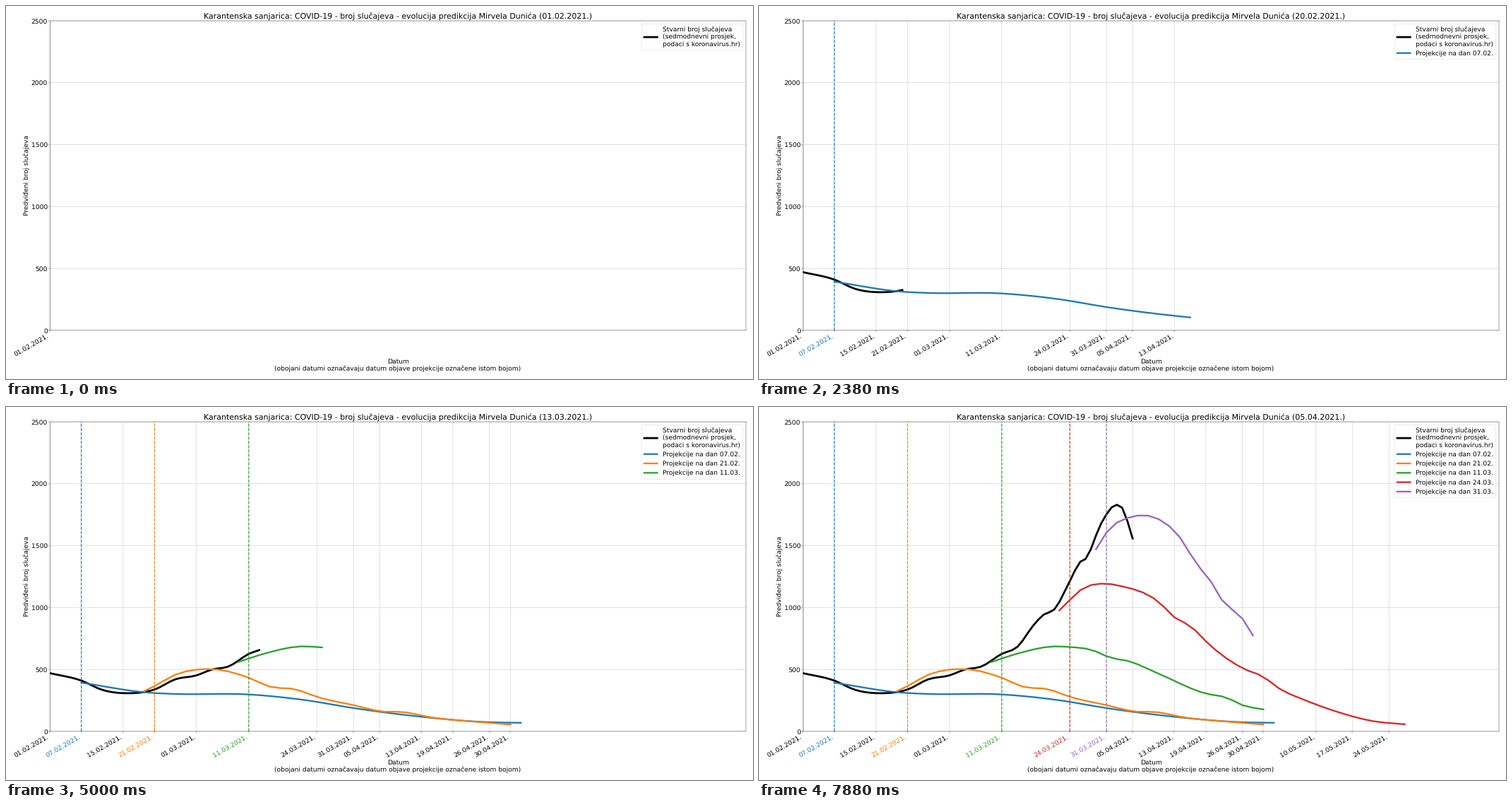
Write a matplotlib script that moves like this. It is 1058 px wide and 529 px high and loops after 8 s.

```python
import matplotlib.pyplot as plt
import numpy as np
from matplotlib.animation import FuncAnimation
from matplotlib.dates import num2date

WIDTH, HEIGHT = 1058, 529
FIRST_DAY = 18659  # 1 February 2021, in days since 1970
FRAMES, LAST_DAY = 64, 133
REVEAL = 5  # days of a projection uncovered per frame
TICKS = [0, 6, 14, 20, 28, 38, 51, 58, 63, 71, 77, 84, 88, 98, 105, 112]

# Key points as (day, cases)
CASES = [(0, 470), (6, 410), (10, 335), (15, 308), (20, 338), (24, 421),
         (28, 452), (31, 500), (34, 522), (38, 626), (41, 683), (44, 854),
         (46, 943), (48, 983), (51, 1213), (53, 1370), (54, 1392), (57, 1680),
         (60, 1830), (61, 1806), (63, 1558)]

# Publication day, colour, key points
PROJECTIONS = [
    (6, "tab:blue", [(6, 393), (19, 312), (24, 302), (38, 298), (49, 251),
                     (58, 188), (69, 127), (84, 74), (90, 69)]),
    (20, "tab:orange", [(18, 325), (20, 366), (24, 458), (29, 502), (32, 499),
                        (38, 433), (42, 361), (47, 339), (51, 279), (58, 212),
                        (64, 158), (67, 158), (73, 112), (83, 72), (88, 55)]),
    (38, "tab:green", [(36, 560), (41, 628), (48, 686), (51, 681), (55, 660),
                       (59, 592), (62, 570), (68, 465), (77, 305), (81, 272),
                       (84, 211), (88, 177)]),
    (51, "tab:red", [(49, 977), (54, 1166), (57, 1193), (61, 1171), (68, 1045),
                     (71, 920), (74, 851), (78, 687), (84, 510), (88, 440),
                     (91, 346), (96, 251), (102, 159), (109, 82), (115, 57)]),
    (58, "tab:purple", [(56, 1470), (58, 1606), (63, 1735), (67, 1731),
                        (72, 1569), (75, 1367), (78, 1208), (81, 1007),
                        (83, 962), (86, 774)]),
]
COLORS = {start: color for start, color, _ in PROJECTIONS}


def date(day, fmt="%d.%m.%Y."):
    return num2date(FIRST_DAY + day).strftime(fmt)


def smooth(keys, step):
    """Sample a cubic Hermite curve through the key points every `step` days."""
    x, y = np.array(keys, float).T
    slope = np.gradient(y, x)
    days = np.arange(x[0], x[-1] + 1, step)
    i = np.clip(np.searchsorted(x, days, side="right") - 1, 0, len(x) - 2)
    h = x[i + 1] - x[i]
    t = (days - x[i]) / h
    rise = t * t * (3 - 2 * t)
    bend = t * (1 - t) * ((1 - t) * slope[i] - t * slope[i + 1])
    return days, y[i] + (y[i + 1] - y[i]) * rise + h * bend


plt.rcParams.update({"font.family": "DejaVu Sans", "font.size": 20,
                     "text.hinting": "none", "path.snap": False})
fig = plt.figure(figsize=(32, 16), dpi=WIDTH / 32)
left, right, top, bottom = 62.2, 1048, 21, 460
ax = fig.add_axes([left / WIDTH, 1 - bottom / HEIGHT,
                   (right - left) / WIDTH, (bottom - top) / HEIGHT])
ax.set_xlim(0, LAST_DAY)
ax.set_ylim(0, 2500)
ax.set_yticks(range(0, 2501, 500))
ax.grid(True)
ax.set_ylabel("Predviđeni broj slučajeva")
ax.set_xlabel("Datum\n(obojani datumi označavaju datum objave "
              "projekcije označene istom bojom)")
title = ax.set_title("")

case_days, cases = smooth(CASES, 1)
actual, = ax.plot([], [], color="black", lw=6,
                  label="Stvarni broj slučajeva\n(sedmodnevni prosjek,\n"
                        "podaci s koronavirus.hr)")
projections = []
for start, color, keys in PROJECTIONS:
    curve, = ax.plot([], [], color=color, lw=5,
                     label="Projekcije na dan " + date(start, "%d.%m."))
    marker = ax.axvline(start, color=color, lw=2.5, ls="--")
    projections.append((start, curve, marker, *smooth(keys, 2)))


def draw(today):
    title.set_text("Karantenska sanjarica: COVID-19 - broj slučajeva - evolucija "
                   f"predikcija Mirvela Dunića ({date(today)})")
    actual.set_data(case_days[:today + 1], cases[:today + 1])

    reach = today
    handles = [actual]
    for start, curve, marker, days, values in projections:
        active = today >= start
        shown = active & (days < start + REVEAL * (today - start + 1))
        curve.set_data(days[shown], values[shown])
        marker.set_visible(active)
        if active:
            handles.append(curve)
            reach = max(reach, days[shown][-1])

    ticks = [d for d in TICKS if d <= reach]
    ax.set_xticks(ticks, labels=[date(d) for d in ticks], rotation=30, ha="right")
    for day, label in zip(ticks, ax.get_xticklabels()):
        published = day in COLORS and today >= day
        label.set_color(COLORS[day] if published else "black")
    ax.legend(handles=handles, loc="upper right")
    return []


anim = FuncAnimation(fig, draw, frames=FRAMES, init_func=lambda: draw(0),
                     interval=125, repeat=True, repeat_delay=0, blit=False)
plt.show()
```
